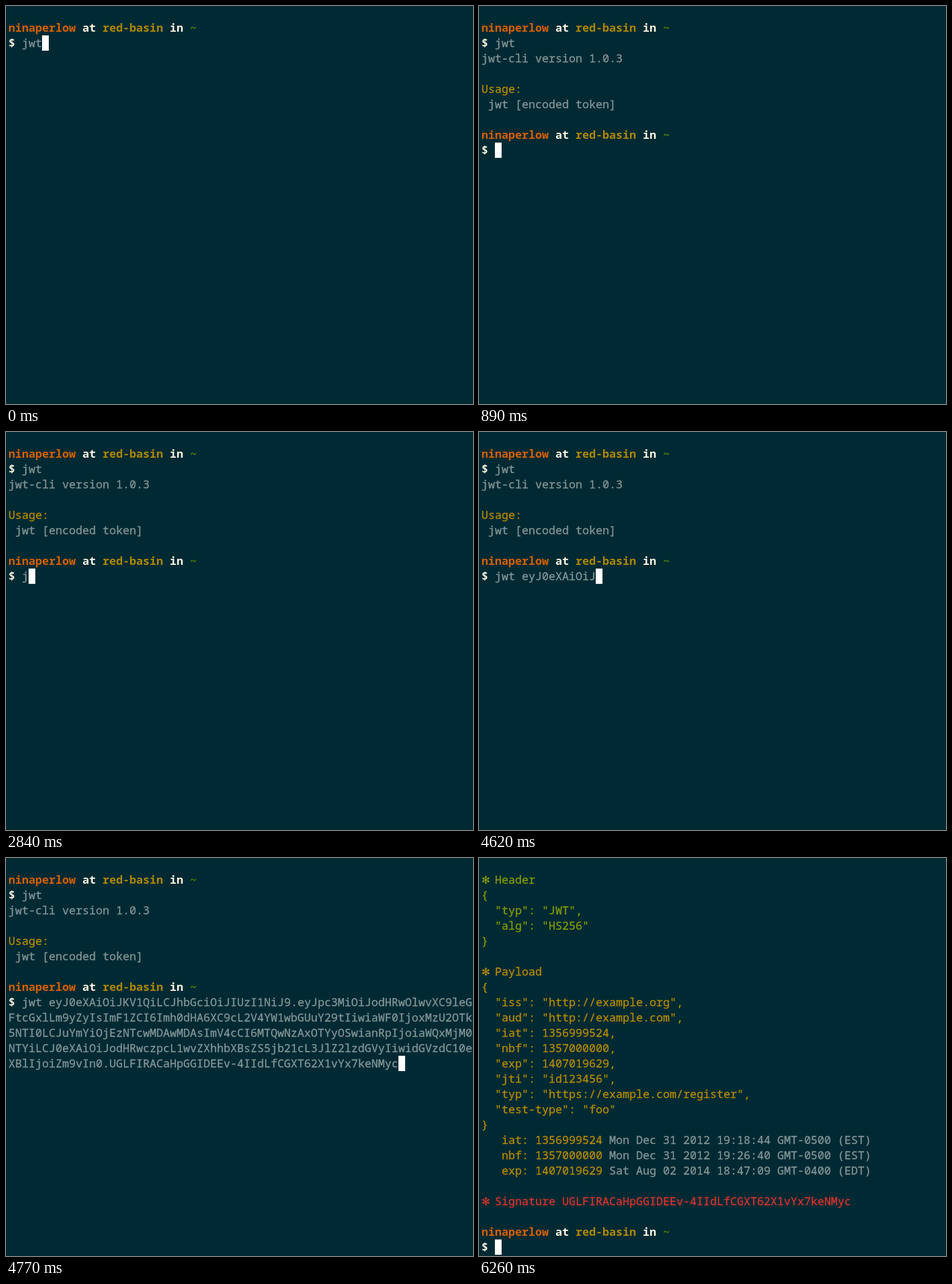
Write an HTML page that moves like this. It is 764 px wide and 650 px high and loops after 8000 ms.

```html
<!DOCTYPE html>
<html lang="en">
<head>
<meta charset="utf-8">
<title>jwt-cli demo</title>
<style>
  html, body {
    margin: 0;
    width: 100%;
    height: 100%;
    overflow: hidden;
    background: #002a33;
  }
  pre {
    position: absolute;
    left: 4px;
    top: 22px;
    margin: 0;
    color: #839496;
    font: 18.3334px/25px "Noto Sans Mono", "DejaVu Sans Mono", monospace;
    font-variant-ligatures: none;
    -webkit-text-stroke: 0.35px;
  }
  b {
    color: #fdf6e3;
    font-weight: 600;
    -webkit-text-stroke: 0;
  }
  .user { color: #d75f00; }
  .host { color: #af8700; }
  .dir { color: #5f8700; }
  .yellow { color: #b58900; }
  .green { color: #859900; }
  .red { color: #dc322f; }
  .star {
    display: inline-block;
    width: 11px;
    font: 17px/17px "DejaVu Sans", sans-serif;
  }

  .cursor {
    position: absolute;
    left: 4px;
    top: 23px;
    width: 11px;
    height: 25px;
    background: #fff;
  }

  /* One cell is 11 x 25 px; every change is a hard step in an 8 s loop. */
  .cursor, .session, .result, .output, .key1, .key2, .key3, .part, .rest {
    animation: 8s step-end infinite;
  }
  .cursor { animation-name: cursor; }
  .session { animation-name: session; }
  .result { animation-name: result; }
  .output { animation-name: output; }
  .key1 { animation-name: key1; }
  .key2 { animation-name: key2; }
  .key3 { animation-name: key3; }
  .part { animation-name: part; }
  .rest { animation-name: rest; }

  @keyframes session { 0% { opacity: 1 } 78.25%, 100% { opacity: 0 } }
  @keyframes result { 0% { opacity: 0 } 78.25%, 100% { opacity: 1 } }
  @keyframes output { 0% { opacity: 0 } 11.125%, 100% { opacity: 1 } }
  @keyframes key1 { 0% { opacity: 0 } 35.5%, 100% { opacity: 1 } }
  @keyframes key2 { 0% { opacity: 0 } 37.375%, 100% { opacity: 1 } }
  @keyframes key3 { 0% { opacity: 0 } 41%, 100% { opacity: 1 } }
  @keyframes part { 0% { opacity: 0 } 57.75%, 100% { opacity: 1 } }
  @keyframes rest { 0% { opacity: 0 } 59.625%, 100% { opacity: 1 } }
  @keyframes cursor {
    0% { transform: translate(55px, 25px) }
    9.25% { transform: translate(0, 50px) }
    11.125% { transform: translate(22px, 200px) }
    35.5% { transform: translate(33px, 200px) }
    37.375% { transform: translate(44px, 200px) }
    41% { transform: translate(55px, 200px) }
    44.75% { transform: translate(66px, 200px) }
    57.75% { transform: translate(187px, 200px) }
    59.625% { transform: translate(638px, 300px) }
    76.5% { transform: translate(0, 325px) }
    78.25%, 100% { transform: translate(22px, 600px) }
  }
</style>
</head>
<body>
<pre class="session"><b class="user">ninaperlow</b> <b>at</b> <b class="host">red-basin</b> <b>in</b> <b class="dir">~</b>
<b>$</b> jwt
<span class="output">jwt-cli version 1.0.3

<span class="yellow">Usage:</span>
 jwt [encoded token]

<b class="user">ninaperlow</b> <b>at</b> <b class="host">red-basin</b> <b>in</b> <b class="dir">~</b>
<b>$</b> </span><span class="key1">j</span><span class="key2">w</span><span class="key3">t</span> <span class="part">eyJ0eXAiOiJ</span><span class="rest">KV1QiLCJhbGciOiJIUzI1NiJ9.eyJpc3MiOiJodHRwOlwvXC9leG
FtcGxlLm9yZyIsImF1ZCI6Imh0dHA6XC9cL2V4YW1wbGUuY29tIiwiaWF0IjoxMzU2OTk
5NTI0LCJuYmYiOjEzNTcwMDAwMDAsImV4cCI6MTQwNzAxOTYyOSwianRpIjoiaWQxMjM0
NTYiLCJ0eXAiOiJodHRwczpcL1wvZXhhbXBsZS5jb21cL3JlZ2lzdGVyIiwidGVzdC10e
XBlIjoiZm9vIn0.UGLFIRACaHpGGIDEEv-4IIdLfCGXT62X1vYx7keNMyc</span></pre>

<pre class="result"><span class="green"><span class="star">✻</span> Header
{
  "typ": "JWT",
  "alg": "HS256"
}</span>

<span class="yellow"><span class="star">✻</span> Payload
{
  "iss": "http://example.org",
  "aud": "http://example.com",
  "iat": 1356999524,
  "nbf": 1357000000,
  "exp": 1407019629,
  "jti": "id123456",
  "typ": "https://example.com/register",
  "test-type": "foo"
}</span>
   <span class="yellow">iat: 1356999524</span> Mon Dec 31 2012 19:18:44 GMT-0500 (EST)
   <span class="yellow">nbf: 1357000000</span> Mon Dec 31 2012 19:26:40 GMT-0500 (EST)
   <span class="yellow">exp: 1407019629</span> Sat Aug 02 2014 18:47:09 GMT-0400 (EDT)

<span class="red"><span class="star">✻</span> Signature UGLFIRACaHpGGIDEEv-4IIdLfCGXT62X1vYx7keNMyc</span>

<b class="user">ninaperlow</b> <b>at</b> <b class="host">red-basin</b> <b>in</b> <b class="dir">~</b>
<b>$</b></pre>

<div class="cursor"></div>
</body>
</html>
```
